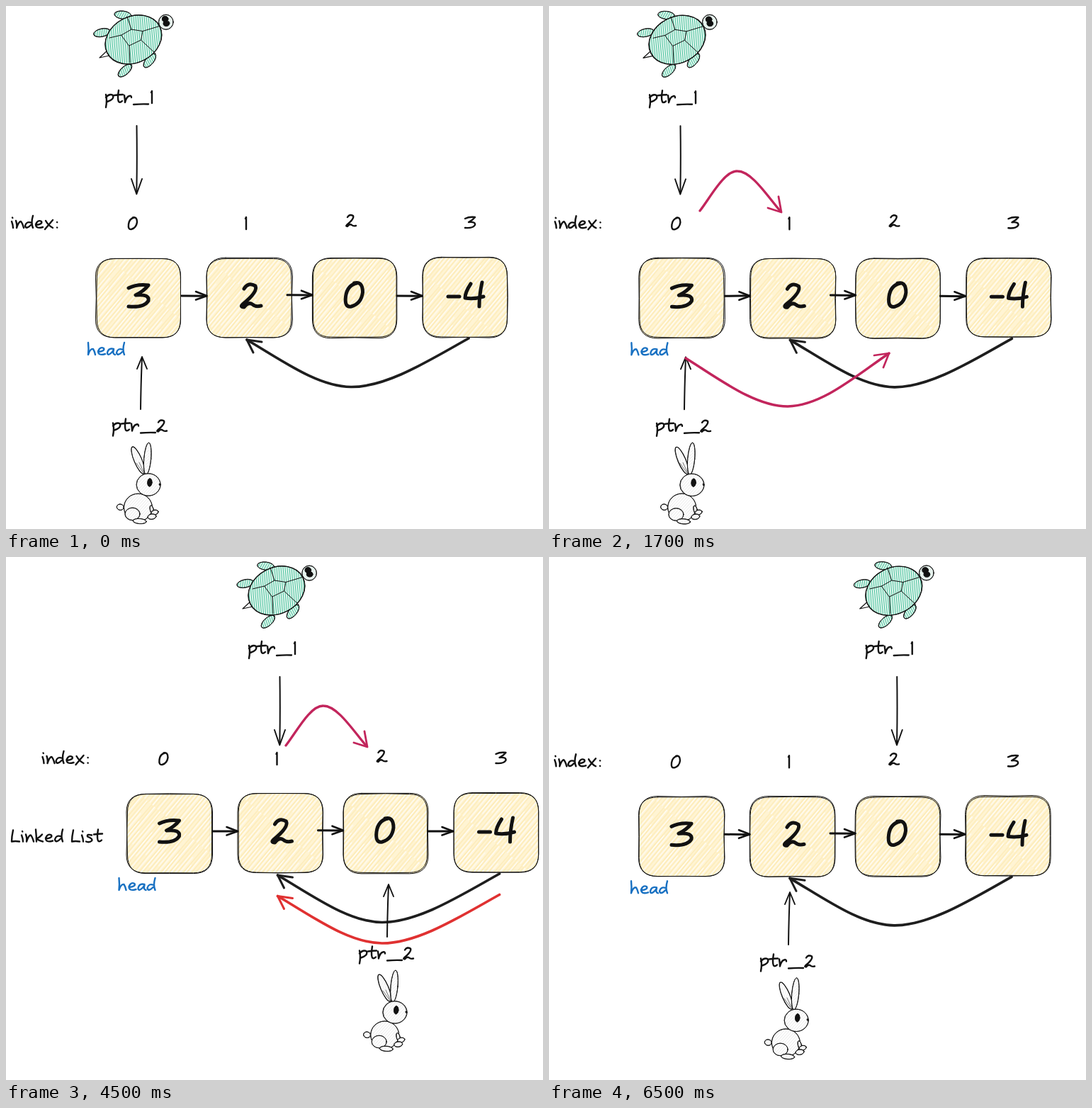
Animation of 758x738 px, one loop 8 s. Source, as an HTML page:

```html
<!DOCTYPE html>
<html lang="en">
<head>
<meta charset="utf-8">
<title>Two pointers on a linked list</title>
<style>
  html, body { margin: 0; width: 100%; height: 100%; overflow: hidden; background: #fff; }
  svg { display: block; width: 100%; height: 100%; }
  text { fill-opacity: 0; font-family: Inter, sans-serif; }
</style>
</head>
<body>
<svg viewBox="0 0 758 738" fill="none" stroke-linecap="round" stroke-linejoin="round">
  <defs>
    <pattern id="yellow" width="90" height="24" patternUnits="userSpaceOnUse" patternTransform="rotate(-50)">
      <path fill="#fff4d3" d="M0 0H90V24H0z"/>
      <path stroke="#fde8ac" stroke-width="1.1" d="M-1 2L91 3M-1 7L91 6M-1 11L91 12M-1 16H91M-1 21L91 20"/>
      <path stroke="#fff" stroke-width="1.2" d="M-1 4.5H60M20 9L91 8.5M-1 14L50 13.5M30 18L91 18.5M0 23H70"/>
    </pattern>
    <pattern id="green" width="7" height="3" patternUnits="userSpaceOnUse" patternTransform="rotate(-68)">
      <path fill="#dff5ec" d="M0 0H7V3H0z"/>
      <path stroke="#4fc3a0" stroke-width="1.15" d="M-1 1.5H8"/>
    </pattern>
    <pattern id="grey" width="7" height="3" patternUnits="userSpaceOnUse" patternTransform="rotate(-48)">
      <path fill="#fff" d="M0 0H7V3H0z"/>
      <path stroke="#e9e9e9" stroke-width=".8" d="M-1 1.5H8"/>
    </pattern>
  </defs>
  <g id="stage"></g>
</svg>
<script>
const INK = '#111', PINK = '#c2255c', RED = '#e03131', BLUE = '#1971c2';
const LOOP = 8000;

// Each pose: start time, then offsets of the list, the turtle and the rabbit.
const poses = [
  { at: 0, list: [0, 0], turtle: [0, 0], rabbit: [0, 0] },
  { at: 500, list: [.4, .3], turtle: [1, .3], rabbit: [1, .3], hop: [0, 0], leap: true },
  { at: 2500, list: [0, -9.7], turtle: [152.3, 0], rabbit: [302, -14] },
  { at: 4500, list: [43.5, -22], turtle: [202, 0], rabbit: [348, -33], hop: [182, -23], title: true, back: true },
  { at: 6500, list: [0, -17.7], turtle: [306.7, 0], rabbit: [148, -22] }
];

// Handwritten letters: advance width and pen path on a baseline at y = 0.
const letters = {
  ' ': [9, ''],
  p: [13, 'M2-12Q4-4 2 6M2-8Q7-14 12-11Q14-5 4-2'],
  t: [13, 'M7-18Q5-6 7-2Q9 0 12-3M1-11Q7-12 13-12'],
  r: [14, 'M2-11Q3-5 3-1Q5-9 9-10Q12-11 12-8'],
  _: [23, 'M1 2Q12 1 22 1.5'],
  0: [16, 'M10-16.5Q3-15 2-7Q1 1 6 0Q13-2 14-10Q14-18 8-16.5'],
  1: [8, 'M3-15L4-17Q4-8 4 0'],
  2: [17, 'M3-13Q6-18 11-15Q13-11 2-2Q0 0 3 0Q6-4 9-2Q11 0 15-1'],
  3: [17, 'M1-14Q7-17 15-16Q12-12 6-9Q16-10 15-5Q12 0 1-1'],
  4: [17, 'M6-16Q2-10 2-6Q8-5 15-7M14-17Q12-8 12 0'],
  '-': [10, 'M0-7L8-7'],
  i: [6, 'M1-10Q3-5 3-1M2-15.5L2.3-15'],
  n: [13, 'M1-11Q3-5 2-1Q5-10 8-10Q10-8 12-1'],
  d: [14, 'M10-8Q3-11 1-4Q2 2 9-5M12-18Q9-8 12-1'],
  e: [14, 'M2-5Q12-6 10-10Q5-13 2-6Q2 1 12-2'],
  x: [16, 'M2-11Q6-4 12-1M12-12Q6-5 1 1'],
  ':': [6, 'M2-9l.2.2M2-1.5l.2.2'],
  h: [14, 'M2-18Q3-9 2-1Q5-10 9-9Q11-6 12-1'],
  a: [13, 'M10-9Q3-11 1-4Q1 2 8-5L10-8Q8-2 12-1'],
  L: [15, 'M4-17Q2-8 2-1Q7-2 13-1'],
  k: [14, 'M2-18Q3-8 3-1M11-11Q8-7 3-5Q7-2 12-1'],
  s: [11, 'M9-10Q2-12 3-8Q11-5 9-2Q6 1 1-1']
};

let seed = 1;
const random = () => (seed = seed * 16807 % 2147483647) / 2147483647;
const jitter = (v, amount = 1.1) => (v + (random() - .5) * 2 * amount).toFixed(2);

const line = (d, width = 1.2, color = INK, fill = 'none') =>
  `<path d="${d}" stroke="${color}" stroke-width="${width}" fill="${fill}"/>`;
const move = ([x, y], body) => `<g transform="translate(${x} ${y})">${body}</g>`;

// An oval gone round twice by an unsteady pen.
function oval(x, y, rx, ry, turn = 0, fill = 'url(#grey)', width = .9) {
  const ring = paint => `<ellipse cx="${jitter(x, .35)}" cy="${jitter(y, .35)}" rx="${rx}" ry="${ry}"
    fill="${paint}" stroke="${INK}" stroke-width="${width}" transform="rotate(${turn} ${x} ${y})"/>`;
  return ring(fill) + ring('none');
}

// Transparent text keeps the handwriting selectable.
function write(str, x, y, color = INK, scale = 1, width = 2.4) {
  let pen = 0, out = '';
  for (const c of str) {
    const [advance, d] = letters[c];
    out += `<path transform="translate(${pen})" d="${d}"/>`;
    pen += advance;
  }
  return `<g transform="translate(${x} ${y}) scale(${scale})" stroke="${color}" stroke-width="${width / scale}">
    ${out}<text font-size="22" stroke="none">${str}</text></g>`;
}

function box(x, y) {
  const w = 119.5, h = 112, r = 26;
  const outline = () => {
    const l = jitter(x), t = jitter(y), e = jitter(x + w), b = jitter(y + h);
    return `M${x + r} ${t}Q${x + w / 2} ${jitter(y)} ${x + w - r} ${t}Q${e} ${t} ${e} ${y + r}` +
      `Q${jitter(x + w)} ${y + h / 2} ${e} ${y + h - r}Q${e} ${b} ${x + w - r} ${b}` +
      `Q${x + w / 2} ${jitter(y + h)} ${x + r} ${b}Q${l} ${b} ${l} ${y + h - r}` +
      `Q${jitter(x)} ${y + h / 2} ${l} ${y + r}Q${l} ${t} ${x + r} ${t}`;
  };
  return line(outline(), 1, INK, 'url(#yellow)') + line(outline(), 1);
}

const link = (x, y) =>
  line(`M${x} ${y}L${x + 35} ${jitter(y, .5)}`, 3) +
  line(`M${x + 20} ${y - 6}L${x + 35.5} ${y}L${x + 20} ${y + 5.5}`, 2.6);

const backLink = color =>
  line('M653 469C599 499 538 538 487 537.5C440 537 391 501 340 471', 3.7, color) +
  line('M349 489L340 471L361 474', 3, color);

function list(pose) {
  const values = [[127.5, 356, '3', 171, 426], [284, 356, '2', 330, 425],
    [432.5, 356, '0', 475.5, 424], [588.5, 355.3, '-4', 624, 424]];
  const indices = [[171, 315], [335, 315], [479, 311], [647, 314]];
  return values.map(([x, y, value, tx, ty]) => box(x, y) + write(value, tx, ty, INK, 2, 5)).join('') +
    indices.map(([x, y], i) => write(String(i), x, y)).join('') +
    write('index:', 7, 314) +
    write('head', 114, 493, BLUE) +
    link(248, 409) + link(397, 407.7) + link(552, 409) +
    backLink('#1e1e1e') +
    (pose.back ? move([0, 29.5], backLink(RED)) : '') +
    (pose.title ? write('Linked List', -37.5, 424.5) : '');
}

function turtle() {
  const fin = (x, y, turn) => oval(x, y, 12, 5.6, turn, 'url(#green)');
  return fin(165, 12.5, 6) + fin(135.5, 37.5, -12) + fin(168, 91, -42) + fin(203, 77, -50) +
    line('M144 62L132 73L146 70', 1.2) +
    oval(180, 47.5, 41.5, 32.5, -27, 'url(#green)', 1.1) +
    line('M163 41L177 33L193 35.5L190.5 48L174 56ZM163 41L146 45M177 33L171 15' +
      'M193 35.5L218 28M190.5 48L211 67M174 56L175 80', 1) +
    oval(226, 22.5, 10.3, 10.5, 0, '#e6f2ed') +
    oval(224.5, 18.5, 4.2, 3.8, 0, INK) + oval(226.5, 24.5, 4.2, 3.6, 0, INK) +
    write('ptr_1', 139, 137) +
    line('M184.5 169Q185.2 218 184.3 264', 2) +
    line('M177 244L184.3 265.5L192 244', 1.9);
}

function rabbit() {
  return oval(186.5, 641, 5.5, 20.5, -23) + oval(199.8, 638.5, 5, 22.5, 5) +
    line('M184 645L194 659M188 644L195 659', .8, '#555') +
    oval(161.5, 707, 5, 4.2, 10) +
    oval(186.5, 707.5, 20, 19.5) +
    oval(201, 675.5, 17, 15.7) +
    oval(202.8, 672.3, 3.1, 5.6, 4, INK) + oval(217, 675, .7, 1.2, 0, INK) +
    oval(178.5, 717, 10.5, 8.8) +
    oval(189, 727, 9.5, 3.6, 4) +
    oval(206, 711, 2.5, 6.5, -15) + oval(210, 714.5, 5.2, 3.3, -15) + oval(206, 720.5, 6, 3.7, -8) +
    write('ptr_2', 149, 600.5) +
    line('M190 569Q190.5 530 192 496', 2) +
    line('M185 512L192 495L199 512', 1.9);
}

const hop = () =>
  line('M213 289C228 270 247 232.5 266 233C286 233 308 268 327 290', 3.3, PINK) +
  line('M309 285L328 291L324 269', 2.8, PINK);

const leap = () =>
  line('M193 497C240 526 290 565 337 565C385 564 432 523 480 490', 3.5, PINK) +
  line('M459 493L480 490L472 510', 2.7, PINK);

function draw(pose) {
  seed = pose.at + 97;
  return move(pose.list, list(pose)) + move(pose.turtle, turtle()) + move(pose.rabbit, rabbit()) +
    (pose.hop ? move(pose.hop, hop()) : '') + (pose.leap ? leap() : '');
}

const stage = document.getElementById('stage');
let shown;
function update() {
  const t = performance.now() % LOOP;
  const pose = poses.findLast(p => p.at <= t);
  if (pose !== shown) {
    stage.innerHTML = draw(pose);
    shown = pose;
  }
  requestAnimationFrame(update);
}
update();
</script>
</body>
</html>
```
